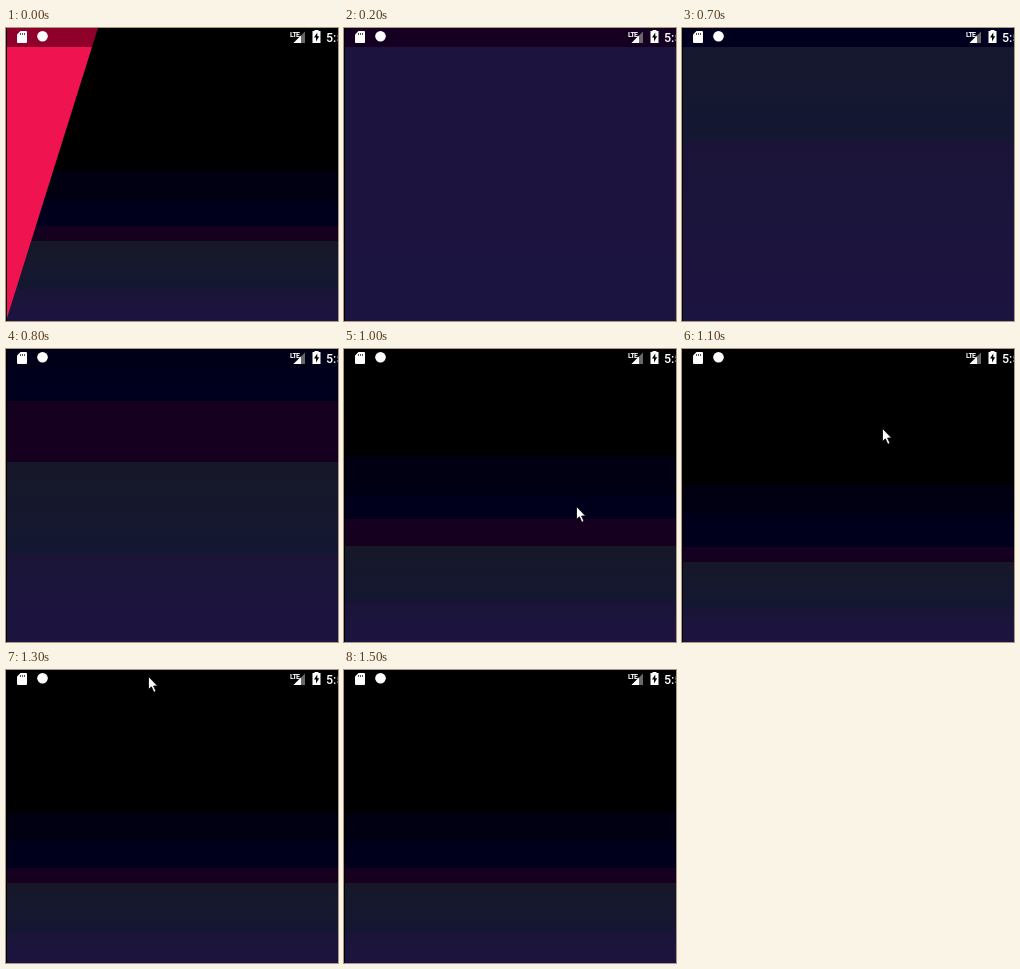
Recreate the animation shown at these times as an HTML page. Size 332 px wide and 293 px high, loop 2100 ms.

```html
<!DOCTYPE html>
<html lang="en">
<head>
<meta charset="utf-8">
<title>Dark screen reveal</title>
<style>
html, body { margin: 0; width: 100%; height: 100%; overflow: hidden; background: #000; }

/* Edges of the bands, top down, plus the pointer position. */
.stage {
  position: relative; width: 332px; height: 293px; overflow: hidden; background: #000;
  animation: scene 2100ms step-end infinite;
}
.bands {
  position: absolute; inset: 0 0 0 1px;
  background: linear-gradient(
    #000 var(--night),
    #000010 var(--night), #000014 var(--navy),
    #00001a var(--navy), #00001e var(--plum),
    #15001f var(--plum), #16001f var(--slate),
    #161828 var(--slate), #141732 var(--violet),
    #1b1438 var(--violet), #1c1440 293px);
}
.bar { position: absolute; left: 1px; top: 0; right: 0; height: 19px; background: var(--bar); }
.wedge { visibility: var(--wedge); }
svg { position: absolute; left: 0; top: 0; }
.pointer { transform: translate(var(--x), var(--y)); }

@keyframes scene {
  0% {
    --night: 143px; --navy: 172px; --plum: 198px; --slate: 213px; --violet: 262px;
    --bar: #000; --wedge: visible; --x: -40px; --y: -40px;
  }
  9.523% {
    --night: -900px; --navy: -900px; --plum: -900px; --slate: -900px; --violet: -800px;
    --bar: #150021; --wedge: hidden; --x: -40px; --y: -40px;
  }
  33.333% {
    --night: -300px; --navy: -250px; --plum: -200px; --slate: -100px; --violet: 114px;
    --bar: #00001e; --x: -40px; --y: -40px;
  }
  38.095% {
    --night: -100px; --navy: -40px; --plum: 52px; --slate: 113px; --violet: 205px;
    --bar: #000018; --x: -40px; --y: -40px;
  }
  42.857% {
    --night: -30px; --navy: 19px; --plum: 130px; --slate: 167px; --violet: 242px;
    --bar: #000010; --x: 247px; --y: 252px;
  }
  47.619% {
    --night: 107px; --navy: 145px; --plum: 170px; --slate: 197px; --violet: 253px;
    --bar: #000; --x: 232px; --y: 157px;
  }
  52.38% {
    --night: 136px; --navy: 165px; --plum: 198px; --slate: 213px; --violet: 260px;
    --x: 200px; --y: 79px;
  }
  57.142% {
    --night: 143px; --navy: 172px; --plum: 198px; --slate: 213px; --violet: 262px;
    --x: 167px; --y: 29px;
  }
  61.904% { --x: 142px; --y: 6px; }
  66.666% { --x: 119px; --y: -7px; }
  71.428%, 100% {
    --night: 143px; --navy: 172px; --plum: 198px; --slate: 213px; --violet: 262px;
    --bar: #000; --wedge: hidden; --x: -40px; --y: -40px;
  }
}
</style>
</head>
<body>
<div class="stage">
  <div class="bands"></div>
  <div class="bar"></div>
  <svg width="332" height="293" viewBox="0 0 332 293">
    <g class="wedge">
      <path d="M1 0H92L86 19H1Z" fill="#8f002b"/>
      <path d="M1 19H86L1 290Z" fill="#ef144f"/>
    </g>

    <!-- memory card -->
    <path d="M14.5 3H20Q21 3 21 4V14Q21 15 20 15H12Q11 15 11 14V6.5Z" fill="#fff"/>
    <path d="M14.5 5v2M16.5 5v2M18.5 5v2" stroke="#555"/>
    <circle cx="36.5" cy="8.3" r="5.3" fill="#fff"/>

    <!-- signal -->
    <path d="M299 3.5V15H287.5Z" fill="#686868"/>
    <path d="M295 7.5V15H287.5Z" fill="#fff"/>
    <text x="284" y="9" font-family="Roboto, Arial, sans-serif" font-size="7" font-weight="700" letter-spacing="-.7" fill="#fff">LTE</text>

    <!-- battery -->
    <path d="M308.5 3V2H312.5V3H314.5V15H306.5V3Z" fill="#fff"/>
    <path d="M311.3 4.5L308 9.6H310V13.5L313.2 8.3H311.3Z" fill="#000"/>
    <text x="320" y="14" font-family="Roboto, Arial, sans-serif" font-size="12.5" font-weight="500" fill="#fff">5:5</text>

    <path class="pointer" d="M.5 .5V13.5L3.4 10.8L5.8 16.3L8 15.3L5.6 10H9.6Z" fill="#fff" stroke="#000" stroke-width=".8"/>
  </svg>
</div>
</body>
</html>
```
